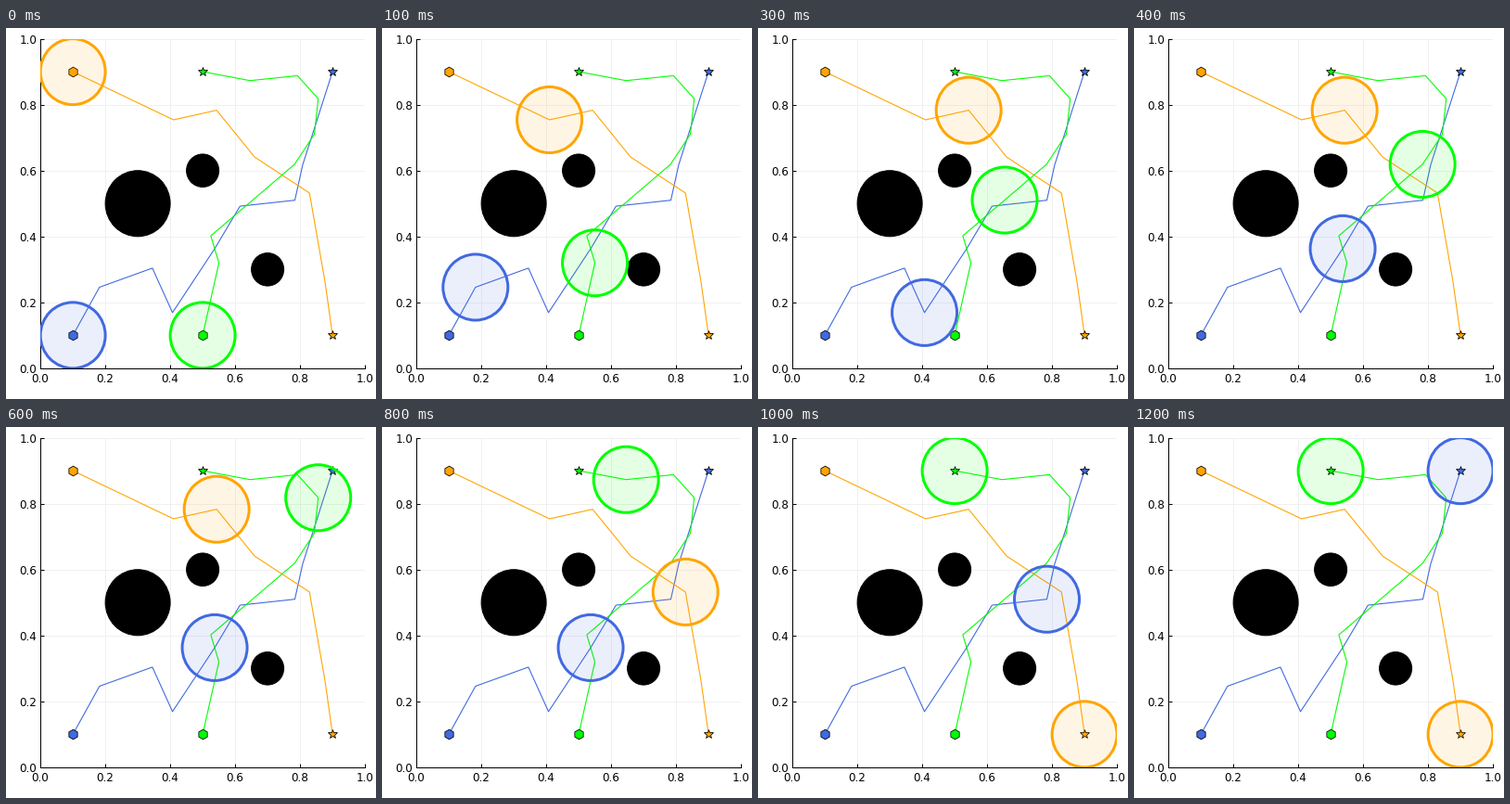
These frames come from a looping animation (399x400 px, 1.3 s). A matplotlib script:

```python
import matplotlib.pyplot as plt
import numpy as np
from matplotlib.animation import FuncAnimation
from matplotlib.colors import to_rgba
from matplotlib.patches import Circle

W, H, DPI = 399, 400, 100
LEFT, TOP, PLOT_W, PLOT_H = 37.1, 11.6, 350, 355.3
STEPS, STEP_MS = 13, 100
RADIUS = 0.1
LOW, MID, HIGH = 0.1, 0.5, 0.9


def px(n):
    return n * 72 / DPI


class Robot:
    """A disc that follows key points; `steps` -> `stops` sets its pace."""

    def __init__(self, color, start, via, goal, steps, stops):
        self.color = color
        self.path = np.array([start, *via, goal])
        self.steps, self.stops = steps, stops
        self.disc = Circle(start, RADIUS, facecolor=to_rgba(color, 0.1),
                           edgecolor=color, linewidth=px(3), zorder=5)

    def position(self, step):
        s = np.interp(step, self.steps, self.stops)
        index = np.arange(len(self.path))
        return [np.interp(s, index, axis) for axis in self.path.T]

    def draw(self, ax):
        ax.plot(*self.path.T, color=self.color, linewidth=px(1.1), zorder=3)
        for point, marker in ((self.path[0], "h"), (self.path[-1], "*")):
            ax.plot(*point, marker=marker, markersize=px(10.7),
                    color=self.color, markeredgecolor="black",
                    markeredgewidth=px(0.8), zorder=4)
        ax.add_patch(self.disc)


robots = [
    Robot("royalblue", (LOW, LOW),
          [(0.182, 0.246), (0.345, 0.304), (0.407, 0.169), (0.537, 0.363),
           (0.615, 0.492), (0.784, 0.51), (0.808, 0.617)],
          (HIGH, HIGH), steps=(0, 4, 8, 12), stops=(0, 4, 4, 8)),
    Robot("orange", (LOW, HIGH),
          [(0.41, 0.754), (0.543, 0.783), (0.66, 0.641), (0.829, 0.532),
           (0.877, 0.262)],
          (HIGH, LOW), steps=(0, 2, 6, 10), stops=(0, 2, 2, 6)),
    Robot("lime", (MID, LOW),
          [(0.55, 0.32), (0.525, 0.402), (0.783, 0.619), (0.844, 0.71),
           (0.856, 0.818), (0.792, 0.888), (0.646, 0.873)],
          (MID, HIGH), steps=(0, 2, 4, 9), stops=(0, 2, 3, 8)),
]

fig = plt.figure(figsize=(W / DPI, H / DPI), dpi=DPI, facecolor="white")
ax = fig.add_axes([LEFT / W, 1 - (TOP + PLOT_H) / H, PLOT_W / W, PLOT_H / H])
ax.set(xlim=(0, 1), ylim=(0, 1))
ax.set_axisbelow(True)

ticks = np.linspace(0, 1, 6)
labels = [f"{t:.1f}" for t in ticks]
ax.set_xticks(ticks, labels)
ax.set_yticks(ticks, labels)
ax.tick_params(direction="in", length=px(4), width=px(1), pad=px(4),
               labelsize=px(12), labelfontfamily="DejaVu Sans")
ax.tick_params(axis="x", pad=px(5.5))
ax.grid(color="#f0f0f0", linewidth=px(1))
ax.spines[["top", "right"]].set_visible(False)
ax.spines[["left", "bottom"]].set_linewidth(px(1))

for x, y, r in [(0.3, 0.5, 0.1), (0.5, 0.6, 0.05), (0.7, 0.3, 0.05)]:
    ax.add_patch(Circle((x, y), r, color="black", linewidth=px(1), zorder=2))
for robot in robots:
    robot.draw(ax)


def update(step):
    for robot in robots:
        robot.disc.center = robot.position(step)
    return [robot.disc for robot in robots]


anim = FuncAnimation(fig, update, frames=STEPS, interval=STEP_MS,
                     repeat=True, repeat_delay=0, blit=False)
plt.show()
```
